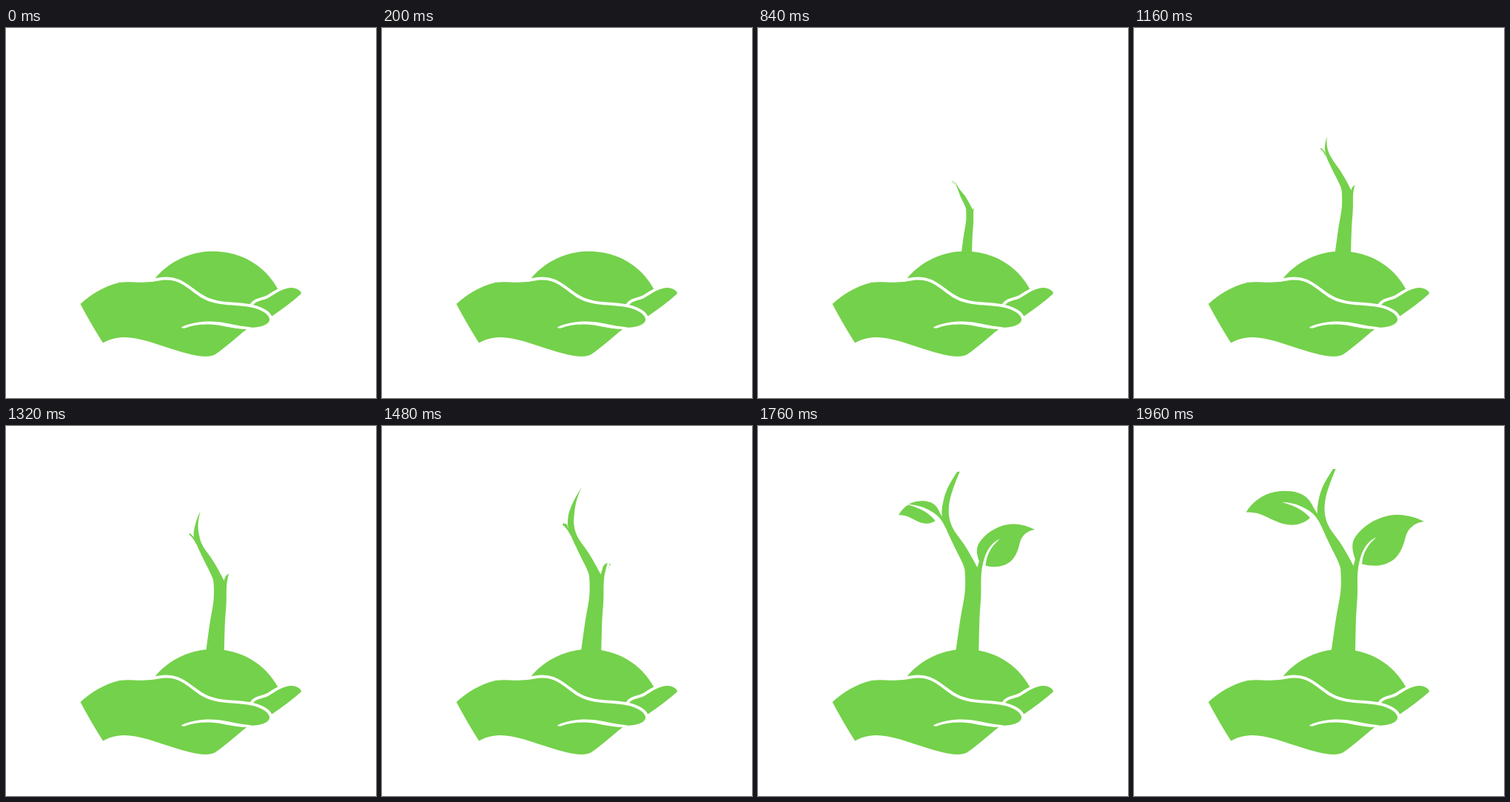
An HTML page that plays this animation: 500x500 px, repeating every 2000 ms.

```html
<!DOCTYPE html>
<html lang="en">
<head>
<meta charset="utf-8">
<title>Growing seedling</title>
<style>
html, body { margin: 0; width: 100%; height: 100%; overflow: hidden; background: #fff; }
svg { display: block; width: 100%; height: 100%; }
.halo { stroke: #fff; stroke-width: 8; stroke-linejoin: round; paint-order: stroke; }
.gap { fill: #fff; }
</style>
</head>
<body>
<svg viewBox="0 0 500 500" fill="#74d14b">
  <!-- mound, fingers, hand, palm crease -->
  <path d="M202 337.5C221 315 250 301.7 279 301.7C318 301.7 350 321 367.5 353L331 376L300 385L215 350Z"/>
  <path class="halo" d="M333 375.5C338 367.5 347 369 355 364.5C365 358 376 351 386 351C392 351 399 355 399 359C388 369 373 380 360 389L350 395Z"/>
  <path class="halo" d="M100.5 373C115 360 131 349.500 153 344C168 341.500 182 346 205 341.7C228 337 239 346 252 356C266 367 276 372 300 374.3C325 376 340 377 352 386.500C359 393 357 399 347 402.500C340 404.800 334 404.800 328 405L326 406.500C312 417 298 431 282 441.500C270 447 250 442 225 434C190 423 160 409 131 425.500C120 408 110 391 100.500 373Z"/>
  <path class="gap" d="M237.5 404C260 393.5 285 396 300 399.3C312 401.8 322 403.7 331 404.2L327 407C315 407 305 405 292 402.400C272 399 256 400.5 242 405.5C239 406 236.500 405.500 237.500 404Z"/>

  <g id="plant">
    <path id="bladeL" d="M249 121L248 118.500C243 113 241 104 234 97.500C226 89 208 86 191 89C173 92 159 104 151.500 116.500C175 115 187 131 210 133.500C222 134.500 232 130 238 124L247 122Z"/>
    <path id="bladeR" d="M297 188L299 180C294 166 293 156 302 146C315 130 338 119 358 120C370 120.500 382 124 392 129C378 131 370 139 367 150C363 166 358 176 348 182.500C336 190 322 190 308 186.500Z"/>
    <path class="gap" d="M200 103C216 103 232 109 247 122.500L240 127L238 124C226 111 214 107 200 103Z"/>
    <path class="gap" d="M327.500 150.500C312 157 304 175 302 200L307.500 200L308 187C309 172 316 160 327.500 150.500Z"/>
    <path id="budL" d="M254 137C250 129 247 122.500 238.500 115.500L240 112C243 116 246 118 249 121L253 128Z"/>
    <path id="budR" d="M291 215C293 203 295 192 299 181C301 177 304 175 307 173.500C304 183 302.500 192 302 204L301 220Z"/>
    <path id="stem"/>
  </g>
</svg>
<script>
const LOOP = 2000, STEP = 40, SAMPLES = 120;
const ROOT = { x: 281, y: 303 };

// Stem at full size: y, centre x, half width
const STEM = [
  [304, 282.8, 16.2], [260, 286.5, 13.5], [225, 290.5, 11.5], [200, 290.2, 10.7],
  [186, 286, 9], [160, 272.3, 7.8], [137, 259, 5], [119, 253, 5],
  [100, 254, 4.5], [80, 260, 4], [58, 270.8, 1.8]
];

const $ = id => document.getElementById(id);
const clamp = v => Math.min(1, Math.max(0, v));
const easeOut = (u, power) => 1 - (1 - u) ** power;

function scaleAbout(id, x, y, sx, sy = sx) {
  $(id).setAttribute("transform", `translate(${x} ${y}) scale(${sx} ${sy}) translate(${-x} ${-y})`);
}

// Catmull-Rom point on the stem, p from 0 (root) to 1 (tip)
function stemAt(p) {
  const last = STEM.length - 1;
  const i = Math.min(last - 1, Math.floor(p * last)), f = p * last - i;
  const b = STEM[i], c = STEM[i + 1], a = STEM[i - 1] || b, d = STEM[i + 2] || c;
  return b.map((v, k) => v + f / 2 * (c[k] - a[k]
    + f * (2 * a[k] - 5 * v + 4 * c[k] - d[k] + f * (3 * (v - c[k]) + d[k] - a[k]))));
}

// Ribbon up to the height reached, tapering towards the growing end
function stemPath(reach, thickness) {
  const sideA = [], sideB = [];
  for (let i = 0; i <= SAMPLES; i++) {
    const [y, x, half] = stemAt(i / SAMPLES);
    const left = reach - (ROOT.y - y);
    if (left < 0) break;
    const w = half * thickness * clamp(left / 40);
    sideA.push(`${(x - w).toFixed(2)} ${y.toFixed(2)}`);
    sideB.unshift(`${(x + w).toFixed(2)} ${y.toFixed(2)}`);
  }
  return "M" + [...sideA, ...sideB].join("L") + "Z";
}

function draw(now) {
  const t = Math.floor((now % LOOP) / STEP) * STEP;
  const u = clamp((t - 320) / 1640);
  const size = easeOut(u, 2), width = easeOut(u, 1.5);
  scaleAbout("plant", ROOT.x, ROOT.y, size);
  $("stem").setAttribute("d", u ? stemPath(165 + 155 * u * u, width / size) : "");
  scaleAbout("budL", 251, 129, width);
  scaleAbout("budR", 298, 205, width);

  const v = clamp((t - 1440) / 520), open = easeOut(v, 1.8);
  scaleAbout("bladeL", 248, 120, v, v ** .8);
  scaleAbout("bladeR", 300, 188, open, open ** .8);
}

let begin;
function tick(now) {
  begin ??= now;
  draw(now - begin);
  requestAnimationFrame(tick);
}
draw(0);
requestAnimationFrame(tick);
</script>
</body>
</html>
```
